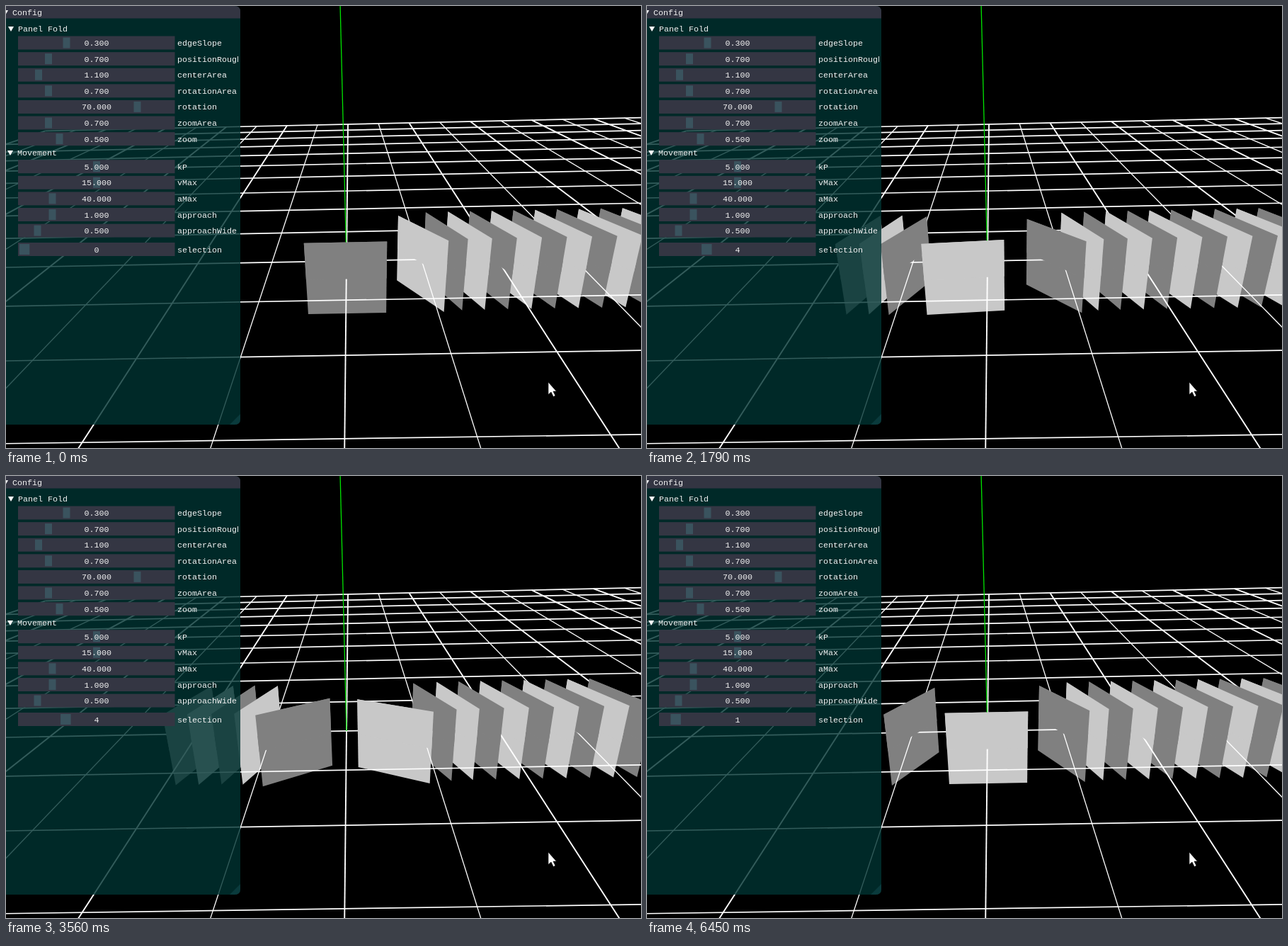
Write an HTML page that moves like this. It is 897x624 px and loops after 8090 ms.

```html
<!DOCTYPE html>
<html lang="en">
<head>
<meta charset="utf-8">
<title>Card carousel</title>
<style>
  html, body { margin: 0; width: 100%; height: 100%; overflow: hidden; background: #000; }
  svg { display: block; }
  text { font: 11.67px "Liberation Mono", "DejaVu Sans Mono", monospace; fill: #f2f2f2; white-space: pre; }
  .value { text-anchor: middle; }
</style>
</head>
<body>
<svg id="stage" width="897" height="624" viewBox="0 0 897 624">
  <rect width="897" height="624" fill="#000"/>
  <g id="below"></g>
  <g id="grid" stroke="#fff"></g>
  <g id="above"></g>
  <path d="M0 0H323Q331 0 331 8V583Q331 591 323 591H0Z" fill="rgb(0,52,50)" fill-opacity=".8"/>
  <path d="M331 576V583Q331 591 323 591H316Z" fill="#0a3a3c"/>
  <path d="M0 0H323Q331 0 331 8V17.500H0Z" fill="#333542"/>
  <svg id="panel" width="328" height="591"></svg>
  <path d="M766 531V548.500L770 545L773.200 551.500L776 550.200L773 544H777.500Z" fill="#fff" stroke="#000" stroke-width=".6"/>
</svg>
<script>
const LOOP = 8090, START = 350, END = 6450, STEP = 110.9;
const COUNT = 15;
const KP = 5;
// moments (ms) at which the selection goes up or down by one
const UPS = [300, 783, 1280, 1717, 1960, 2200, 2515];
const DOWNS = [2960, 3180, 3345, 3720, 4287, 4640];

const $ = id => document.getElementById(id);

function add(parent, tag, attrs, content) {
  const el = document.createElementNS("http://www.w3.org/2000/svg", tag);
  for (const key in attrs) el.setAttribute(key, attrs[key]);
  if (content !== undefined) el.textContent = content;
  parent.appendChild(el);
  return el;
}

// Perspective camera: x right, y up, z towards the viewer
function project(x, y, z) {
  const w = 6.9 - z - 0.4138 * y - 0.013 * x;
  return [
    (3319 - 484.45 * z - 215.2 * y + 721.7 * x) / w,
    (2483.5 - 33.7 * z - 801.6 * y - 18.4 * x) / w
  ];
}

function line(parent, a, b, width, color) {
  const [x1, y1] = project(...a), [x2, y2] = project(...b);
  const attrs = { x1, y1, x2, y2, "stroke-width": width };
  if (color) attrs.stroke = color;
  return add(parent, "line", attrs);
}

function buildGrid() {
  const grid = $("grid");
  for (let i = -10; i <= 10; i++) {
    line(grid, [i, 0, -10], [i, 0, 6], i % 2 ? 1.3 : 1.9);
    if (i <= 5) line(grid, [-10, 0, i], [10, 0, i], 1.7);
  }
  line(grid, [0, 0, 0], [0, 3.4, 0], 1.3, "#00e400");
}

function slider(y, label, value, grabX, grabWidth = 10) {
  const panel = $("panel");
  add(panel, "rect", { x: 17, y: y - 9.5, width: 221.5, height: 19, fill: "#343643" });
  const grab = add(panel, "rect", {
    x: grabX - grabWidth / 2, y: y - 7.5, width: grabWidth, height: 15, fill: "#3a535e"
  });
  const text = add(panel, "text", { x: 128, y: y + 4, class: "value" }, value);
  add(panel, "text", { x: 242, y: y + 4 }, label);
  return { grab, text };
}

function header(x, y, label) {
  const panel = $("panel");
  const left = x - 14;
  add(panel, "path", { d: `M${left} ${y - 3}h8l-4 7z`, fill: "#fff" });
  add(panel, "text", { x, y: y + 4 }, label);
}

function buildPanel() {
  header(9, 9, "Config");
  header(17, 32, "Panel Fold");
  [
    ["edgeSlope", "0.300", 85.5],
    ["positionRoughness", "0.700", 60],
    ["centerArea", "1.100", 46],
    ["rotationArea", "0.700", 60],
    ["rotation", "70.000", 185.5],
    ["zoomArea", "0.700", 60],
    ["zoom", "0.500", 75.5]
  ].forEach((row, i) => slider(52 + i * 22.6, ...row));
  header(16, 207, "Movement");
  [
    ["kP", "5.000", 128],
    ["vMax", "15.000", 128],
    ["aMax", "40.000", 65.5],
    ["approach", "1.000", 65.5],
    ["approachWide", "0.500", 44.5]
  ].forEach((row, i) => slider(226.7 + i * 22.6, ...row));
  return slider(343.5, "selection", "0", 26, 14.5);
}

function buildCards() {
  const cards = [];
  for (let i = 0; i < COUNT; i++) {
    const fill = i % 2 ? "#c8c8c8" : "#808080";
    cards.push({
      index: i,
      full: add($("below"), "polygon", { fill }),
      top: add($("above"), "polygon", { fill })
    });
  }
  return cards;
}

// Place and turn of a card at offset d from the middle
function pose(d) {
  const a = Math.abs(d), s = Math.sign(d);
  const k = 1.39 * a;
  const side = 0.69 * k / Math.pow(1 + k ** 6, 1 / 6);
  const turn = 1 / (1 + (0.58 / Math.max(a, 1e-6)) ** 3);
  return { x: s * (0.3 * a + side), z: 0.5 * (1 - turn), angle: s * turn * 70 * Math.PI / 180 };
}

const points = list => list.map(p => project(...p).map(n => n.toFixed(2)).join()).join(" ");

function drawCard(card, pos) {
  const { x, z, angle } = pose(card.index - pos);
  const dx = Math.cos(angle) / 2, dz = Math.sin(angle) / 2;
  const quad = low => points([
    [x - dx, 0.5, z - dz], [x + dx, 0.5, z + dz],
    [x + dx, low, z + dz], [x - dx, low, z - dz]
  ]);
  card.full.setAttribute("points", quad(-0.5));
  card.top.setAttribute("points", quad(0));
}

const sum = (times, f) => times.reduce((total, at) => total + f(at), 0);

function stateAt(t) {
  const now = t < START ? 0
    : Math.min(END, START + Math.floor((t - START + 10) / STEP) * STEP);
  const step = at => now >= at ? 1 : 0;
  const eased = at => now >= at ? 1 - Math.exp(-KP * (now - at) / 1000) : 0;
  return {
    selection: sum(UPS, step) - sum(DOWNS, step),
    pos: sum(UPS, eased) - sum(DOWNS, eased)
  };
}

buildGrid();
const picker = buildPanel();
const cards = buildCards();
let lastPos = -1;

function render(t) {
  const { selection, pos } = stateAt(t);
  if (pos === lastPos) return;
  lastPos = pos;
  picker.grab.setAttribute("x", 18.8 + selection * 14.57);
  picker.text.textContent = selection;
  // the floor grid hides only what lies under it, so both halves sort alike
  [...cards]
    .sort((a, b) => Math.abs(b.index - pos) - Math.abs(a.index - pos))
    .forEach(card => {
      drawCard(card, pos);
      $("below").appendChild(card.full);
      $("above").appendChild(card.top);
    });
}

const begin = performance.now();
function tick() {
  render((performance.now() - begin) % LOOP);
  requestAnimationFrame(tick);
}
tick();
</script>
</body>
</html>
```
